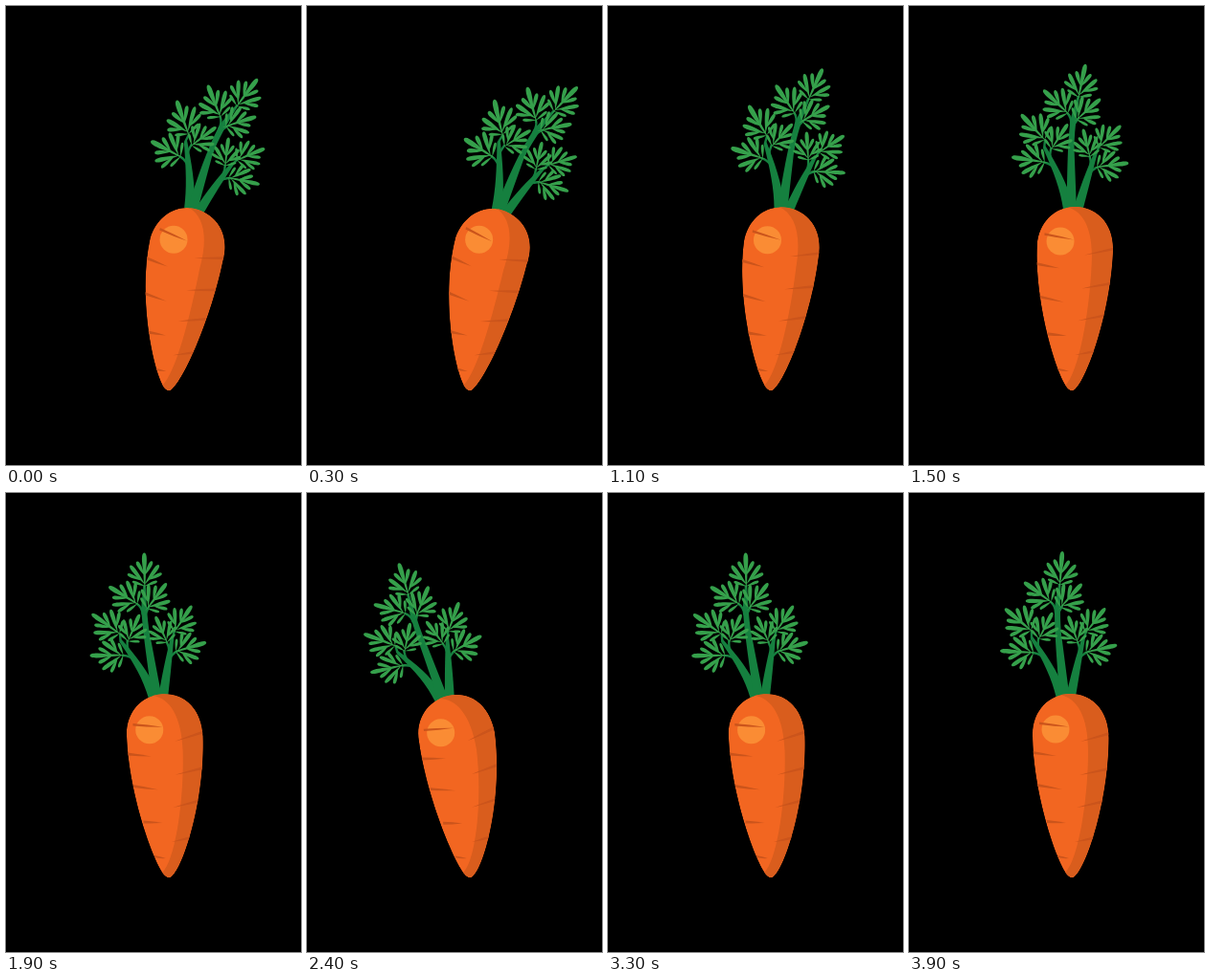
An HTML page with a canvas that plays this animation: 308x480 px, repeating every 4 s.

```html
<!DOCTYPE html>
<html lang="en">
<head>
<meta charset="utf-8">
<title>Swaying carrot</title>
<style>
  html, body { margin: 0; width: 308px; height: 480px; overflow: hidden; background: #000; }
  canvas { display: block; }
</style>
</head>
<body>
<canvas id="stage" width="308" height="480"></canvas>
<script>
const ctx = document.getElementById('stage').getContext('2d');
const LOOP = 4000, STEP = 100;
const TIP = { x: 170, y: 402 }, HEIGHT = 341;
const STEM = '#15803f', LEAF = '#35a04b', MARK = '#cb541b';

const mapPath = (d, fn) =>
  d.replace(/(-?[\d.]+),(-?[\d.]+)/g, (_, x, y) => fn(+x, +y).map(v => v.toFixed(2)).join(','));

// Spindle-shaped lobe from x,y to tx,ty, fattest towards its tip.
function lobe(x, y, tx, ty, fat) {
  const dx = tx - x, dy = ty - y, len = Math.hypot(dx, dy);
  const at = (along, side) =>
    `${(x + dx * along - dy / len * side).toFixed(2)},${(y + dy * along + dx / len * side).toFixed(2)}`;
  return `M${x},${y} C${at(0.45, fat * 0.7)} ${at(1, fat * 1.2)} ${tx},${ty} ` +
    `C${at(1, -fat * 1.2)} ${at(0.45, -fat * 0.7)} ${x},${y} Z `;
}

// A leaf growing upwards from 0,0.
const leafPath = lobe(0, 2, 0, -24, 1.8) + lobe(0, -10, 0, -37, 3.4) + [-1, 1].map(side =>
  lobe(0, -13, side * 8, -28, 2.8) +
  lobe(0, -4, side * 15, -24, 3) +
  lobe(side * 3, -8, side * 18, -15, 2.6) +
  lobe(0, -2, side * 13, -7, 2.1)).join('');

function leaf(x, y, degrees, size = 1) {
  const a = degrees * Math.PI / 180, c = Math.cos(a) * size, s = Math.sin(a) * size;
  return { color: LEAF, d: mapPath(leafPath, (u, v) => [x + u * c - v * s, y + u * s + v * c]) };
}

// Wedge-shaped crease, thick at its outer end.
const crease = (x1, y1, x2, y2, thick = 3) => ({
  color: MARK,
  d: `M${x1},${y1} Q${(x1 + x2) / 2},${(y1 + y2) / 2 - 0.5} ${x2},${y2} Q${(x1 + x2) / 2},${(y1 + y2) / 2 + 2} ${x1},${y1 + thick} Z`
});

const greens = [
  { color: STEM, d: 'M153.5,213 C149,194 141,177 127,153 L129,150 C143,168 155,186 162,205 L164,213 Z' },
  { color: STEM, d: 'M164,213 C169,190 174,172 181,150 L184,151 C181,170 178,190 174,213 Z' },
  { color: STEM, d: 'M157,213 C155,180 152,150 152,126 C152,112 155,106 156,95 L158.5,95 C158,115 157,135 160,155 L167.5,213 Z' },
  { color: STEM, width: 2.4, d: 'M143,175 Q138,168 129,167 M136,164 Q134,158 135,152 M128,152 L128,145 M153,125 Q153,118 148,114 M155,130 Q156,124 160,118 M176,176 Q180,169 187,166 M178,166 Q178,160 176,156 M182,153 L185,145' },
  leaf(157.5, 98, 4),
  leaf(150, 115, -54),
  leaf(157, 121, 42, 0.95),
  leaf(129, 145, -50, 1.02),
  leaf(135, 154, 27, 0.88),
  leaf(132, 167, -87),
  leaf(177, 158, -20, 0.85),
  leaf(184, 147, 38, 0.92),
  leaf(183, 167, 77, 0.95)
];

const rightEdge = 'C192,210 208.5,228 208.5,256 C208.5,320 186,390 173,401';
const tipAndLeftEdge = 'Q170,403.5 167,401';
const body = {
  color: '#f26621',
  d: `M168,210 ${rightEdge} ${tipAndLeftEdge} C156,393 129,314 129,252 C129,228 146,210 168,210 Z`
};
const skin = [
  body,
  { color: '#d95d1d', d: `M158,210 L168,209 ${rightEdge} ${tipAndLeftEdge} L163,397 C177,384 187,320 187,270 C187,234 176,215 158,211 Z` },
  { color: '#fa8c34', width: 29, d: 'M153,247 L153,247.01' },
  crease(136, 239.5, 167, 244.5, 2.4),
  crease(129, 270, 154, 275),
  crease(134, 304, 160, 310),
  crease(144, 342, 164, 345),
  crease(155, 379, 167, 382, 2),
  crease(209, 250, 179, 260),
  crease(208, 287, 178, 295),
  crease(203, 321, 175, 329),
  crease(194, 359, 173, 365)
];

// Lean of the topmost leaf in degrees.
function leanAt(t) {
  if (t < 700) return 17.5 + 3.7 * Math.sin(Math.PI * t / 700);
  if (t < 2450) return 17.5 - 29.4 * (t - 700) / 1750;
  const p = Math.min(1, (t - 2450) / 1250);
  return -11.9 * (1 + Math.cos(Math.PI * p)) / 2;
}

// Bends the upright drawing into a circular arc that starts at the carrot's tip.
function bender(lean) {
  const k = 2 * lean * Math.PI / 180 / HEIGHT;
  if (Math.abs(k) < 1e-7) return (x, y) => [x, y];
  return (x, y) => {
    const u = x - TIP.x, a = k * (TIP.y - y), c = Math.cos(a), s = Math.sin(a);
    return [TIP.x + (1 - c) / k + u * c, TIP.y - s / k + u * s];
  };
}

function drawPart({ color, width, d }, bend) {
  const path = new Path2D(mapPath(d, bend));
  ctx.fillStyle = ctx.strokeStyle = color;
  if (width) {
    ctx.lineWidth = width;
    ctx.stroke(path);
  } else {
    ctx.fill(path);
  }
}

function draw(t) {
  const bend = bender(leanAt(t));
  ctx.fillStyle = '#000';
  ctx.fillRect(0, 0, 308, 480);
  ctx.lineCap = ctx.lineJoin = 'round';
  greens.forEach(part => drawPart(part, bend));
  ctx.save();
  ctx.clip(new Path2D(mapPath(body.d, bend)));
  skin.forEach(part => drawPart(part, bend));
  ctx.restore();
}

const start = performance.now();
function tick() {
  const t = (performance.now() - start) % LOOP;
  draw(Math.floor(t / STEP) * STEP);
  requestAnimationFrame(tick);
}
tick();
</script>
</body>
</html>
```
